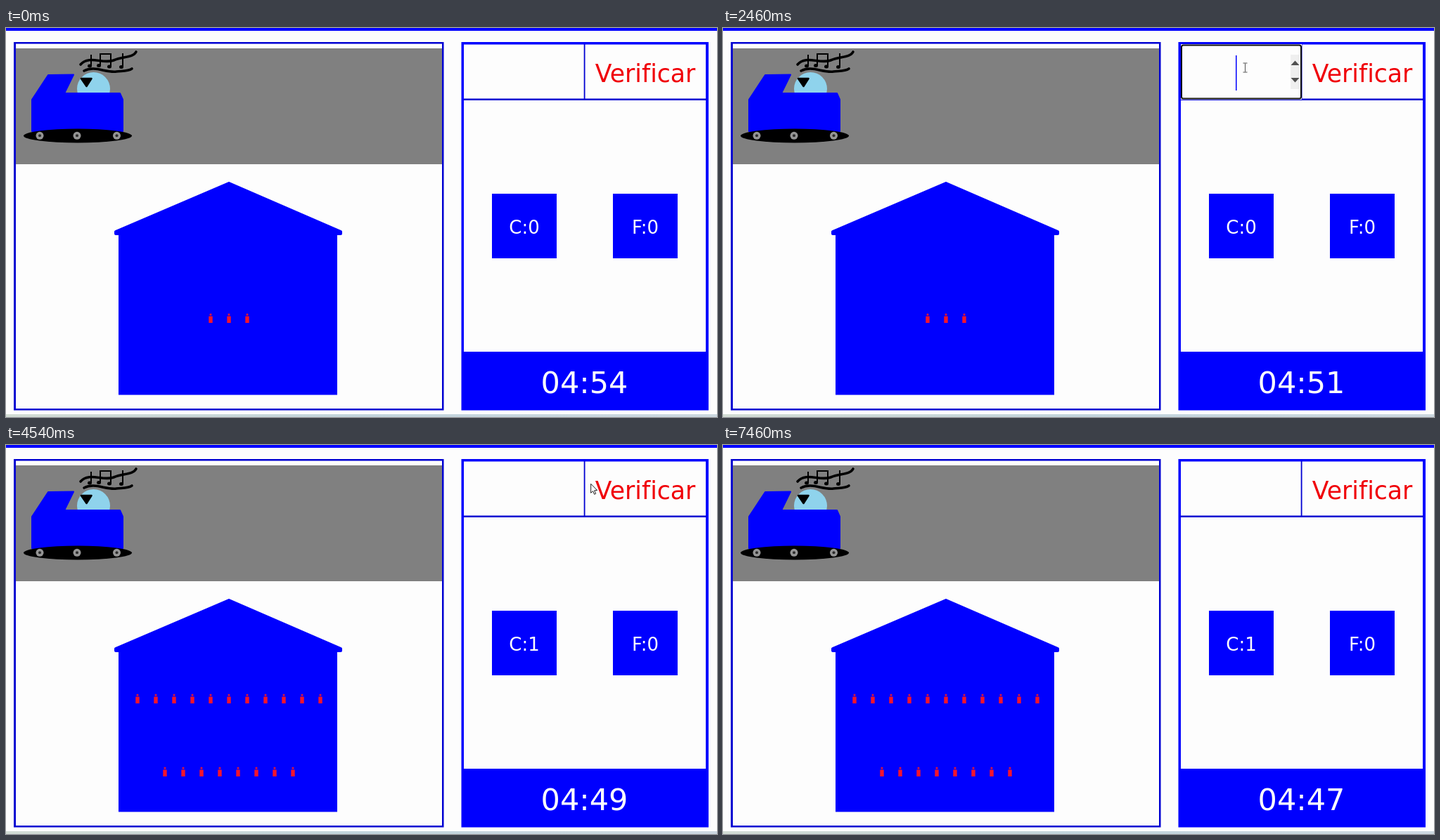
Recreate the animation shown at these times as an HTML page with a canvas. Size 1011x554 px, loop 7.5 s.

```html
<!DOCTYPE html>
<html lang="es">
<head>
<meta charset="utf-8">
<title>Verificar</title>
<style>
html, body { margin: 0; width: 100%; height: 100%; overflow: hidden; background: #fdfdfd; }
canvas { display: block; }
</style>
</head>
<body>
<canvas id="stage" width="1011" height="554"></canvas>
<script>
const ctx = document.getElementById('stage').getContext('2d');
const LOOP = 7500;
const BLUE = '#0000fe', EDGE = '#0000d2', PAPER = '#fdfdfd', RED = '#f00008';
const FOCUS = 1250, TYPED = 2500, CHECKED = 3510;
const TICKS = [460, 1460, 2420, 3420, 4420, 5460, 6460];

function rect(x0, y0, x1, y1, color) {
  ctx.fillStyle = color;
  ctx.fillRect(x0, y0, x1 - x0, y1 - y0);
}

function trace(points, close) {
  ctx.beginPath();
  points.forEach(([x, y]) => ctx.lineTo(x, y));
  if (close) ctx.closePath();
}

function poly(points, color, round = 0) {
  trace(points, true);
  ctx.fillStyle = ctx.strokeStyle = color;
  ctx.fill();
  if (round) {
    ctx.lineWidth = round;
    ctx.lineJoin = 'round';
    ctx.stroke();
  }
}

function line(points, color, width) {
  trace(points);
  ctx.strokeStyle = color;
  ctx.lineWidth = width;
  ctx.stroke();
}

function oval(x, y, rx, ry, color, from = 0, to = Math.PI * 2) {
  ctx.beginPath();
  ctx.ellipse(x, y, rx, ry, 0, from, to);
  ctx.fillStyle = color;
  ctx.fill();
}

function text(str, x, y, size, color, family = '"DejaVu Sans"') {
  ctx.font = `${size}px ${family}, sans-serif`;
  ctx.textAlign = 'center';
  ctx.fillStyle = color;
  ctx.fillText(str, x, y);
}

function curve(x, y, ...segments) {
  ctx.beginPath();
  ctx.moveTo(x, y);
  segments.forEach(s => ctx.bezierCurveTo(...s));
  ctx.strokeStyle = '#000';
  ctx.lineWidth = 3.6;
  ctx.lineCap = 'round';
  ctx.stroke();
  ctx.lineCap = 'butt';
}

function music() {
  curve(106, 52, [118, 38, 138, 52, 153, 46], [166, 40, 180, 43, 185, 34]);
  curve(111, 61, [126, 53, 142, 64, 157, 62], [165, 61, 173, 62, 179, 58]);
  for (const [x, y, top] of [[119, 54, 38], [132, 53.5, 37], [147, 55, 37], [164, 55.5, 36]]) {
    oval(x, y, 3, 2.5, '#000');
    line([[x + 2, y], [x + 2, top]], '#000', 2);
  }
  line([[133, 37], [150, 37]], '#000', 2);
}

function vehicle() {
  oval(124.5, 86.5, 23.5, 23.5, '#8fd3ec');
  poly([[37, 102], [60, 67], [96, 66.5], [83, 93], [162, 93], [166, 102], [166, 147], [37, 147]], BLUE, 2);
  poly([[107, 72], [121.5, 72], [114.5, 83]], '#000', 2.5);
  oval(102, 153.5, 77, 10, '#000');
  for (const x of [48, 101, 157.5]) {
    oval(x, 153.3, 5.5, 5.5, '#949494');
    oval(x, 153.3, 2, 2, '#2c2c2c');
  }
  music();
}

function people(count, top) {
  for (let i = 0; i < count; i++) {
    const x = 317 + (i - (count - 1) / 2) * 26;
    oval(x, top + 1.6, 1.6, 1.6, '#d81440');
    rect(x - 2.7, top + 4, x + 2.7, top + 13.5, '#f4142c');
  }
}

function house(solved) {
  poly([[156, 290], [317, 221], [476, 290], [476, 293], [156, 293]], BLUE, 4);
  rect(160, 290, 471, 522.5, BLUE);
  if (solved) {
    people(11, 354.5);
    people(8, 458.5);
  } else {
    people(3, 406.5);
  }
}

function field(t) {
  const focused = t >= FOCUS && t < CHECKED;
  const typed = t >= TYPED && t < CHECKED;
  if (focused) {
    rect(651, 23, 823, 102, PAPER);
    ctx.beginPath();
    ctx.roundRect(652, 24.5, 170, 76, 2.5);
    ctx.strokeStyle = '#101010';
    ctx.lineWidth = 2;
    ctx.stroke();
  }
  if (focused || (t >= 1130 && t < FOCUS)) {
    rect(807, 38, 820, 87, '#efefef');
    poly([[807.5, 53], [813.5, 46.5], [819.5, 53]], '#505050');
    poly([[807.5, 71], [813.5, 77.5], [819.5, 71]], '#505050');
  }
  if (typed) text('3', 729.5, 77.5, 36, BLUE);
  const since = t - (typed ? TYPED : FOCUS);
  if (focused && since % 1000 < 500) {
    const x = typed ? 741 : 729;
    rect(x, 39, x + 1.5, 89, BLUE);
  }
}

function panels(t) {
  rect(0, 0, 1011, 4, BLUE);
  const strip = ctx.createLinearGradient(0, 0, 1011, 0);
  strip.addColorStop(0, '#d2dcd4');
  strip.addColorStop(0.5, '#c2d4dc');
  strip.addColorStop(1, '#ccd8e0');
  rect(0, 550, 1011, 554, strip);

  rect(11, 20, 622.5, 544.5, EDGE);
  rect(14, 22.5, 620, 542, PAPER);
  rect(14, 29, 620, 194, '#808080');

  rect(647.5, 20, 999, 544.5, BLUE);
  rect(651, 23.5, 995, 461, PAPER);
  rect(651, 100.5, 996, 103, EDGE);
  rect(821.7, 23, 823.5, 102, EDGE);
  rect(691, 236, 783, 328, BLUE);
  rect(863, 236, 955, 328, BLUE);
}

function arrow(x, y) {
  const tip = [[0, 0], [0, 13], [3, 10.3], [5, 15], [7, 14], [5, 9.5], [9, 9.2]];
  const points = tip.map(([a, b]) => [x + a, y + b]);
  poly(points, '#fff');
  trace(points, true);
  ctx.strokeStyle = '#202020';
  ctx.lineWidth = 1;
  ctx.stroke();
}

function beam(x, y) {
  line([[x, y - 6], [x, y + 6]], '#505050', 1);
  for (const dy of [-6.5, 6.5]) line([[x - 3, y + dy], [x + 3, y + dy]], '#505050', 1);
}

const clamp = v => Math.max(0, Math.min(1, v));
const ease = v => v * v * (3 - 2 * v);

// Pointer legs: start, end, from x, from y, to x, to y
const LEGS = [
  [500, 1210, 30, 14, 742.5, 56.5],
  [2620, 3050, 742.5, 56.5, 884, 60],
  [4450, 5050, 884, 60, 40, -16]
];

function pointer(t) {
  if (t < LEGS[0][0] || t >= LEGS[2][1]) return;
  const leg = LEGS.filter(l => t >= l[0]).pop();
  const k = ease(clamp((t - leg[0]) / (leg[1] - leg[0])));
  const x = leg[2] + (leg[4] - leg[2]) * k;
  const y = leg[3] + (leg[5] - leg[3]) * k;
  const overField = x > 652 && x < 806 && y > 24 && y < 101;
  if (overField) beam(x, y);
  else arrow(x, y);
}

function tooltip(t) {
  const alpha = Math.min(clamp((t - 5650) / 220), clamp((6870 - t) / 230));
  if (!alpha) return;
  ctx.save();
  ctx.globalAlpha = alpha;
  rect(23, 0, 110, 17, 'rgba(0,0,0,.22)');
  rect(22, 0, 109, 16, 'rgba(0,0,0,.3)');
  rect(20, 0, 107.5, 15, '#808080');
  rect(21, 0, 106.5, 14, '#f6f6fa');
  text('Pause Recording', 63.5, 10, 10, '#74747c', '"Open Sans"');
  ctx.restore();
}

function draw(t) {
  const solved = t >= CHECKED;
  const seconds = 54 - TICKS.filter(at => t >= at).length;
  rect(0, 0, 1011, 554, PAPER);
  panels(t);
  vehicle();
  house(solved);
  field(t);
  text('Verificar', 909, 77, 34.7, RED);
  text('C:' + (solved ? 1 : 0), 737, 292.5, 26, PAPER);
  text('F:0', 909, 292.5, 26, PAPER);
  text('04:' + seconds, 822.5, 519.5, 43, PAPER);
  tooltip(t);
  pointer(t);
}

const start = performance.now();
function loop() {
  draw((performance.now() - start) % LOOP);
  requestAnimationFrame(loop);
}
loop();
</script>
</body>
</html>
```
